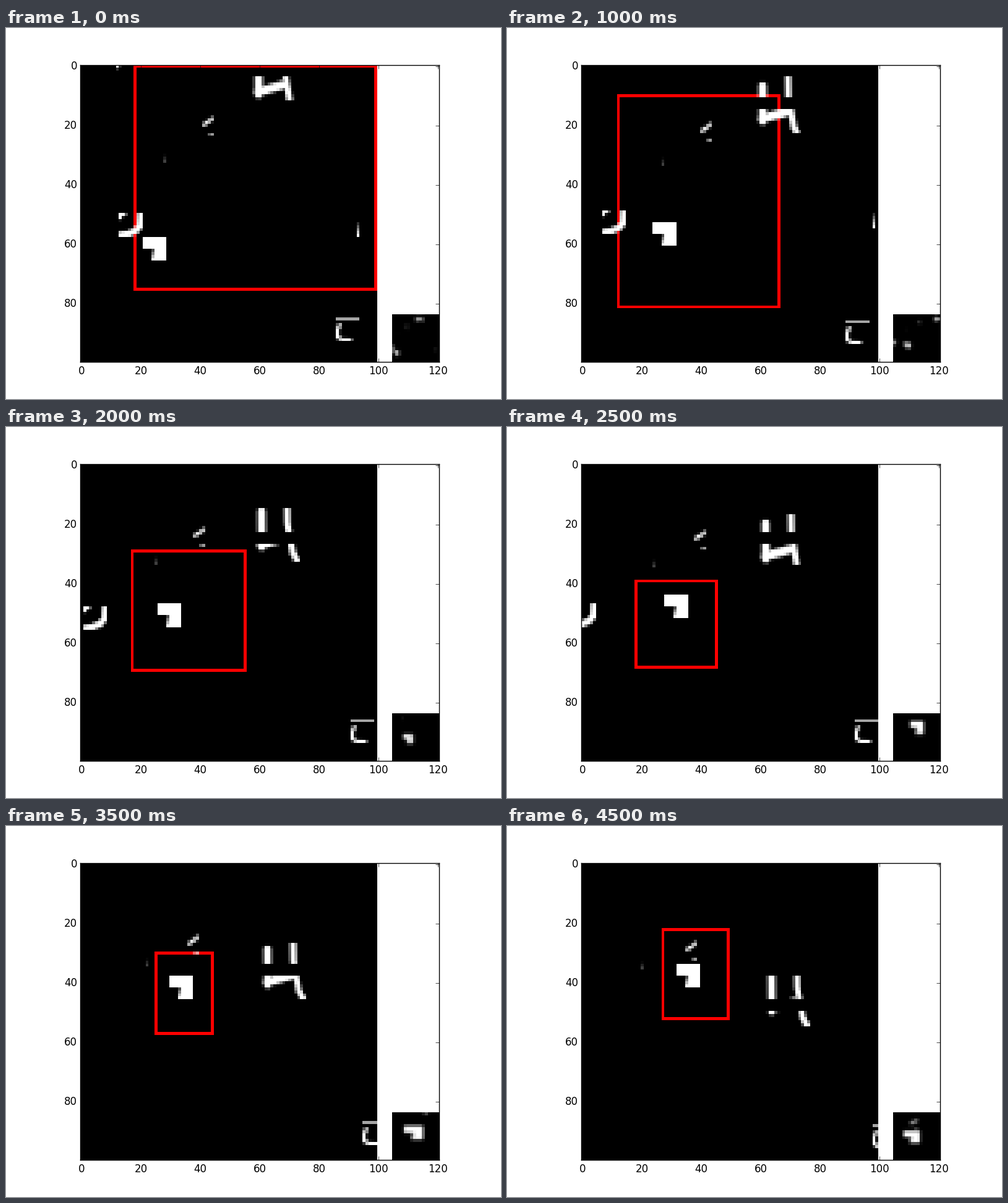
Animation of 800x600 px, one loop 5000 ms. Source, as a matplotlib script:

```python
import numpy as np
import matplotlib.pyplot as plt
from matplotlib.animation import FuncAnimation

plt.style.use("classic")

SIZE, GLIMPSE, STEPS = 100, 16, 10
WIDTH = SIZE + 5 + GLIMPSE

# Key points of the attention window's edges
KEYS = [0, 1, 2, 3, 5, 6, 7, 9]
LEFT = [18, 1, 12, 16, 18, 22, 25, 27]
TOP = [0, 4, 10, 20, 39, 21, 30, 22]
RIGHT = [99, 84, 66, 65, 45, 49, 44, 49]
BOTTOM = [75, 92, 81, 70, 68, 62, 57, 52]


def stroke(shape, points, radius):
    """Draw a soft-edged polyline; coordinates are in cells."""
    yy, xx = np.indices(shape.shape) + .5
    for (ax_, ay), (bx, by) in zip(points, points[1:]):
        dx, dy = bx - ax_, by - ay
        t = np.clip(((xx - ax_) * dx + (yy - ay) * dy) / (dx * dx + dy * dy), 0, 1)
        dist = np.hypot(xx - ax_ - t * dx, yy - ay - t * dy)
        np.maximum(shape, np.clip(radius + .5 - dist, 0, 1), out=shape)


def glyph(w, h, *strokes):
    shape = np.zeros((h, w))
    for points, radius in strokes:
        stroke(shape, points, radius)
    return shape


def fade(lo, n):
    return np.linspace(lo[0], lo[1], n)[:, None]


def make_corner():
    shape = np.ones((8, 8))
    shape[4:, :3] = 0
    shape[4:, 3:4] = fade((.3, .95), 4)
    return shape


CORNER = make_corner()
FOUR = glyph(15, 20,
             ([(2, 3.2), (2.1, 15)], 1.3),
             ([(2, 14.2), (10.5, 11.8)], 1.5),
             ([(10.6, .5), (10.7, 7), (11.8, 13), (12.5, 17), (13.9, 19.5)], 1))
DIAGONAL = glyph(8, 8,
                 ([(7.4, 0), (7.2, 4), (5.8, 5.8), (3, 7), (0, 7.4)], 1.1),
                 ([(.5, 1.5), (.5, .5), (1.8, .3)], .6))
HOOK = glyph(8, 8,
             ([(0, .5), (8, .5)], .15),
             ([(1.2, 2.8), (.4, 4.5), (.6, 6.5), (2, 7.5), (4.8, 7.6)], .6))
COMMA = glyph(4, 7,
              ([(3.3, 1.2), (2.8, 1.8), (.8, 3.2)], .6),
              ([(2.7, 6.5), (3.5, 6.5)], .1))
SPECK = glyph(2, 2, ([(.3, .3), (.5, .5)], .7))
SLIVER = fade((.2, 1), 5)
DOT = fade((.03, .25), 3)


def paste(field, shape, x, y):
    """Put a shape on the field at whole cells, cut off at the edges."""
    x, y = int(np.floor(x)), int(np.floor(y))
    h, w = shape.shape
    cut = shape[max(-y, 0):max(SIZE - y, 0), max(-x, 0):max(SIZE - x, 0)]
    if cut.size:
        view = field[max(y, 0):y + h, max(x, 0):x + w]
        np.maximum(view, cut, out=view)


def scene(k):
    field = np.zeros((SIZE, SIZE))
    paste(field, FOUR, 58.3 + .42 * k, -4.6 + 4.5 * k)
    # evenly spaced bands hide parts of the large digit
    start = min(k, 1)
    for j in range(start, 5):
        row = int(11.7 * j + .6 - start)
        field[row:row + 4] = 0
    paste(field, COMMA, 41.5 - .7 * k, 17 + k)
    paste(field, DOT, 28.9 - .95 * k, 30.31 + .35 * k)
    paste(field, SLIVER, 93.2 + 2.5 * k, 53.6 - 1.5 * k)
    paste(field, DIAGONAL, 13.4 - 3.1 * k, 50 - .09 * k ** 2)
    paste(field, CORNER, 21.86 + 1.23 * k,
          np.interp(k, [0, 7, 9], [58.99, 38.34, 34.5]))
    paste(field, HOOK, 86.95 + 1.05 * k + .02 * k ** 2,
          85.85 + .16 * k + .01 * k ** 2)
    paste(field, SPECK, 12, -2 * k)
    return field


def shrink(n):
    """Matrix that resamples n cells to the glimpse size with a triangle filter."""
    scale = n / GLIMPSE
    centre = (np.arange(GLIMPSE) + .5) * scale
    gap = np.abs(np.arange(n) + .5 - centre[:, None])
    weight = np.clip(1 - gap / scale, 0, None)
    return weight / weight.sum(axis=1, keepdims=True)


def compose(k):
    x0, y0, x1, y1 = (int(np.interp(k, KEYS, edge))
                      for edge in (LEFT, TOP, RIGHT, BOTTOM))
    field = scene(k)
    view = field[y0:y1 + 1, x0:x1 + 1]
    grey = np.ones((SIZE, WIDTH))
    grey[:, :SIZE] = field
    grey[-GLIMPSE:, -GLIMPSE:] = shrink(view.shape[0]) @ view @ shrink(view.shape[1]).T
    rgb = np.stack([grey] * 3, axis=-1)
    rgb[[y0, y1], x0:x1 + 1, 0] = 1
    rgb[y0:y1 + 1, [x0, x1], 0] = 1
    return rgb


# Cell that lies under each pixel of the plot area
COLS = ((np.arange(581) + .5) * WIDTH / 581).astype(int)
ROWS = ((np.arange(480) + 1.5) * SIZE / 481).astype(int)


def picture(k):
    return compose(k)[ROWS][:, COLS]


fig, ax = plt.subplots(figsize=(8, 6), dpi=100, facecolor="white")
image = fig.figimage(picture(0), xo=120, yo=60, origin="upper", zorder=-1)
ax.set_facecolor("none")
ax.set_aspect("equal")
ax.set_xlim(-.5, WIDTH - .5)
ax.set_ylim(SIZE - .5, -.5)
ax.set_xticks(range(0, WIDTH, 20))
ax.set_yticks(range(0, SIZE, 20))
ax.tick_params(axis="y", pad=3.28)


def update(k):
    image.set_data(picture(k))
    return image,


anim = FuncAnimation(fig, update, frames=STEPS, interval=500, repeat=True,
                     repeat_delay=0, blit=False)
plt.show()
```
